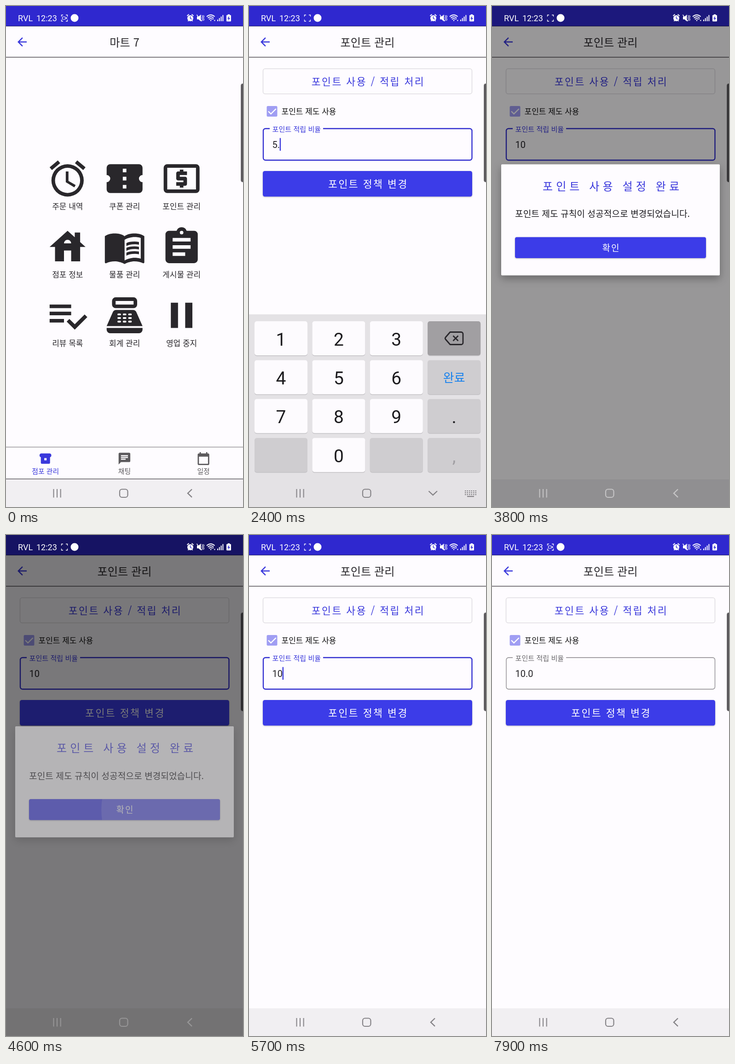
These frames come from a looping animation (515x1087 px, 8000 ms). An HTML page:

```html
<!DOCTYPE html>
<html lang="ko">
<head>
<meta charset="utf-8">
<style>
html, body { margin: 0; width: 100%; height: 100%; overflow: hidden; background: #fefcff; }
svg { display: block; width: 100%; height: 100%; }
text { font-family: 'Noto Sans CJK KR', 'Noto Sans CJK', sans-serif; white-space: pre; }
.num { font-family: Roboto, sans-serif; }
</style>
</head>
<body>
<svg id="stage" viewBox="0 0 515 1087" preserveAspectRatio="none"></svg>
<script>
const LOOP = 8000;
const BLUE = '#3a38dc', INK = '#29272b', PAPER = '#fefcff';

const rect = (x, y, w, h, fill, r = 0, more = '') =>
  `<rect x="${x}" y="${y}" width="${w}" height="${h}" rx="${r}" fill="${fill}" ${more}/>`;
const line = (d, color, w, more = '') =>
  `<path d="${d}" fill="none" stroke="${color}" stroke-width="${w}" ${more}/>`;
const group = (id, body, more = '') => `<g id="${id}" ${more}>${body}</g>`;

// y is the optical middle of the Hangul line
function label(x, y, str, size, { fill = INK, weight = 400, gap = 0, anchor = 'middle' } = {}) {
  const dx = anchor === 'middle' ? gap / 2 : 0;
  return `<text x="${x + dx}" y="${y + size * 0.38}" font-size="${size}" font-weight="${weight}"
    fill="${fill}" letter-spacing="${gap}" text-anchor="${anchor}">${str}</text>`;
}
const num = (x, y, str, size, fill = '#1c1b1e', more = '') =>
  `<text class="num" x="${x}" y="${y}" font-size="${size}" fill="${fill}" ${more}>${str}</text>`;
// 24-unit glyph centred on x, y
const icon = (x, y, k, d, fill = INK) =>
  `<path transform="translate(${x} ${y}) scale(${k}) translate(-12 -12)" d="${d}" fill="${fill}" fill-rule="evenodd"/>`;

const pill = (x, y) => `M${x + .5} ${y}h1a.5 .5 0 0 1 0 1h-1a.5 .5 0 0 1 0-1z`;
const keypad = [11, 13, 15].map(y => [8, 11, 14].map(x => pill(x, y)).join('')).join('');

const GLYPH = {
  alarm: 'M12 20a7 7 0 1 1 0-14 7 7 0 0 1 0 14m0-16a9 9 0 1 0 0 18 9 9 0 0 0 0-18m.5 4H11v6l4.75 2.85.75-1.23-4-2.37V8M7.88 3.39L6.6 1.86 2 5.71l1.29 1.53 4.59-3.85M22 5.72l-4.6-3.86-1.29 1.53 4.6 3.86L22 5.72z',
  ticket: 'M13 8.5h-2v-2h2v2m0 4.5h-2v-2h2v2m0 4.5h-2v-2h2v2M22 10V6a2 2 0 0 0-2-2H4a2 2 0 0 0-2 2v4a2 2 0 0 1 0 4v4a2 2 0 0 0 2 2h16a2 2 0 0 0 2-2v-4a2 2 0 0 1 0-4z',
  cash: 'M11 17h2v-1h1c.55 0 1-.45 1-1v-3c0-.55-.45-1-1-1h-3v-1h4V8h-2V7h-2v1h-1c-.55 0-1 .45-1 1v3c0 .55.45 1 1 1h3v1H9v2h2v1zM20 4H4a2 2 0 0 0-2 2v12a2 2 0 0 0 2 2h16a2 2 0 0 0 2-2V6a2 2 0 0 0-2-2zm0 14H4V6h16v12z',
  house: 'M19 9.3V4h-3v2.6L12 3 2 12h3v8h5v-6h4v6h5v-8h3L19 9.3zm-9 .7a2 2 0 0 1 4 0h-4z',
  book: 'M12 21.5c-1.35-.85-3.8-1.5-5.5-1.5-1.65 0-3.35.3-4.75 1.05-.4.15-.75-.1-.75-.45V6c.6-.45 1.25-.75 2-1 1.11-.35 2.33-.5 3.5-.5 1.95 0 4.05.4 5.5 1.5 1.45-1.1 3.55-1.5 5.5-1.5 1.17 0 2.39.15 3.5.5.75.25 1.4.55 2 1v14.6c0 .35-.35.6-.75.45-1.4-.75-3.1-1.05-4.75-1.05-1.7 0-4.15.65-5.5 1.5M12 8v11.5c1.35-.85 3.8-1.5 5.5-1.5 1.2 0 2.4.15 3.5.5V7c-1.1-.35-2.3-.5-3.5-.5-1.7 0-4.15.65-5.5 1.5z'
    + [11.5, 14.17, 16.84].map(y => `M13 ${y}c1.11-.68 2.6-1 4.5-1 .91 0 1.76.09 2.5.25v-1.52c-.87-.15-1.71-.23-2.5-.23-1.89 0-3.39.28-4.5.84z`).join(''),
  clip: 'M19 3h-4.18a3 3 0 0 0-5.64 0H5a2 2 0 0 0-2 2v14a2 2 0 0 0 2 2h14a2 2 0 0 0 2-2V5a2 2 0 0 0-2-2zm-7 0a1 1 0 1 1 0 2 1 1 0 0 1 0-2zm2 14H7v-2h7v2zm3-4H7v-2h10v2zm0-4H7V7h10v2z',
  list: 'M14 10H2v2h12v-2zm0-4H2v2h12V6zM2 16h8v-2H2v2zm19.5-4.5L23 13l-6.99 7-4.51-4.5L13 14l3.01 3 5.49-5.5z',
  till: 'M17 2H7a2 2 0 0 0-2 2v2a2 2 0 0 0 2 2h10a2 2 0 0 0 2-2V4a2 2 0 0 0-2-2zm0 4H7V4h10v2zm3 16H4a2 2 0 0 1-2-2v-1h20v1a2 2 0 0 1-2 2zM18.53 10.19A2 2 0 0 0 16.7 9H7.3a2 2 0 0 0-1.83 1.19L2 18h20z' + keypad,
  pause: 'M6 19h4V5H6zM14 5v14h4V5z',
  back: 'M20 11H7.83l5.59-5.59L12 4l-8 8 8 8 1.41-1.41L7.83 13H20z',
  chat: 'M20 2H4a2 2 0 0 0-2 2v18l4-4h14a2 2 0 0 0 2-2V4a2 2 0 0 0-2-2zM6 9h12v2H6zm8 5H6v-2h8zm4-6H6V6h12z',
  date: 'M19 20H5V9h14m-3-7v2H8V2H6v2H5a2 2 0 0 0-2 2v14a2 2 0 0 0 2 2h14a2 2 0 0 0 2-2V6a2 2 0 0 0-2-2h-1V2z',
  shop: 'M5 3h14a3.4 3.4 0 0 1 1 6.6V19a2 2 0 0 1-2 2H6a2 2 0 0 1-2-2V9.600a3.400 3.400 0 0 1 1-6.600zM10 11v4h4v-4z'
};

const header = title =>
  rect(0, 44, 515, 983, PAPER) + rect(0, 110.500, 515, 1.300, '#3b393c') +
  icon(35, 78, 1.25, GLYPH.back, BLUE) +
  label(257.500, 79, title, 24.200, { weight: 500 });

function menu() {
  const items = [
    ['alarm', '주문 내역'], ['ticket', '쿠폰 관리'], ['cash', '포인트 관리'],
    ['house', '점포 정보'], ['book', '물품 관리'], ['clip', '게시물 관리'],
    ['list', '리뷰 목록'], ['till', '회계 관리'], ['pause', '영업 중지']];
  const cells = items.map(([g, name], i) => {
    const x = 133.800 + i % 3 * 123.900, y = 374.500 + Math.floor(i / 3) * 148.300;
    return icon(x, y, 3.9, GLYPH[g]) + label(x, y + 60, name, 17, { weight: 500 });
  }).join('');
  const tabs = [['shop', '점포 관리', BLUE, 1.25], ['chat', '채팅', '#5c5a5d', 1.27], ['date', '일정', '#5c5a5d', 1.4]]
    .map(([g, name, c, k], i) => {
      const x = 85.700 + i * 171.700;
      return icon(x, 982, k, GLYPH[g], c) + label(x, 1009, name, 14.900, { fill: c });
    }).join('');
  return header('마트 7') + cells +
    '<circle id="tap" cx="381" cy="392" fill="#29272b"/>' +
    rect(0, 956.500, 515, 1, '#68666a') + tabs + rect(0, 1025.500, 515, 1.300, '#4a484c');
}

function points() {
  return header('포인트 관리') +
    rect(30.500, 136.200, 454, 54.500, 'none', 4.500, 'stroke="#d9d7db" stroke-width="1.3"') +
    label(257.700, 164, '포인트 사용 / 적립 처리', 21.600, { fill: BLUE, weight: 500, gap: 2.500 }) +
    rect(38.500, 217, 23, 23, '#a09ef3', 2.500) +
    line('M42 228.500l5.600 5.600 11-11', '#fff', 2.400) +
    label(70.500, 228.500, '포인트 제도 사용', 17, { fill: '#111', anchor: 'start' }) +
    rect(31, 266, 453.500, 68.500, 'none', 5, 'id="box"') +
    rect(45, 262, 116, 9, PAPER) +
    group('hint', label(50.500, 267, '포인트 적립 비율', 15.100, { fill: 'inherit', anchor: 'start' })) +
    num(50.500, 308, '', 20, '#222024', 'id="value"') +
    rect(0, 286.500, 2.400, 27.500, BLUE, 0, 'id="caret"') +
    rect(30, 358, 455, 55.500, '#3c3ce8', 4.500, 'style="filter:drop-shadow(0 1.500px 1.500px rgba(0,0,0,.25))"') +
    label(257.700, 386, '포인트 정책 변경', 21.600, { fill: '#fff', weight: 500, gap: 2.500 });
}

function keyboard() {
  const rows = [['1', '2', '3', 'del'], ['4', '5', '6', '완료'], ['7', '8', '9', '.'], ['', '0', '', ',']];
  let out = rect(0, 669, 515, 418, '#e4e2e5');
  rows.forEach((row, r) => row.forEach((k, c) => {
    const x = 12 + c * 125.400, y = 684 + r * 84.400, digit = k !== '' && c < 3;
    out += rect(x, y + 1.500, 115, 74, '#c3c1c5', 5) +
      rect(x, y, 115, 74, digit ? '#fdfbfe' : '#cfcdd0', 5, k === 'del' ? 'id="del"' : '');
    const mid = x + 57.500;
    if (k === 'del') {
      out += line('M437 707.500h24a4 4 0 0 1 4 4v19a4 4 0 0 1-4 4h-24l-10-11.500q-1.500-2 0-4z', INK, 2.800, 'stroke-linejoin="round"') +
        line('M443.500 715.500l11 11m0-11l-11 11', INK, 2.800);
    } else if (k === '완료') out += label(mid, y + 38, k, 26, { fill: '#1580ee' });
    else out += num(mid, y + 52.500, k, 39, k === ',' ? '#a19fa3' : '#1c1b1e', 'text-anchor="middle"');
  }));
  return out;
}

function dialog() {
  return rect(20, 415, 475, 241, PAPER, 2, 'style="filter:drop-shadow(0 7px 9px rgba(0,0,0,.3))"') +
    label(258.500, 462, '포인트 사용 설정 완료', 24, { fill: BLUE, weight: 500, gap: 7.100 }) +
    label(50, 522.500, '포인트 제도 규칙이 성공적으로 변경되었습니다.', 19.200, { fill: '#1c1b1f', anchor: 'start' }) +
    rect(50, 573, 415, 45.500, '#3c3ce8', 4, 'style="filter:drop-shadow(0 1.500px 1.500px rgba(0,0,0,.3))"') +
    '<circle id="wave" cx="372" cy="596" fill="#fff" fill-opacity=".16" clip-path="url(#okClip)"/>' +
    label(258, 596, '확인', 19, { fill: '#fff', gap: 2 });
}

function status() {
  const W = '#fff';
  const bars = [0, 1, 2, 3].map(i => rect(459 + i * 3.800, 29.500 - i * 3.300, 2, 3.500 + i * 3.300, W)).join('');
  return num(26, 33.300, 'RVL', 18, W) + num(66, 33.300, '12:23', 18, W) +
    line('M124 19.500h-3.500v3.500M130 19.500h3.500v3.500M124 33h-3.500v-3.500M130 33h3.500v-3.500', W, 1.300) +
    group('cam', rect(122.500, 23.500, 6.500, 5.500, 'none', 1, 'stroke="#fff" stroke-width="1.2"') +
      '<path d="M129.500 26.200l3-2.400v5z" fill="#fff"/>') +
    '<circle cx="149" cy="26" r="8.500" fill="#fff"/>' +
    '<circle cx="400.500" cy="26.500" r="6.500" fill="#fff"/>' +
    line('M393.500 21.500l4-3.500M407.500 21.500l-4-3.500M395.500 33l1.500-2M405.500 33l-1.500-2', W, 1.800) +
    line('M400.500 22.500v4.300l3 1.800', '#2f28cf', 1.400) +
    '<path d="M415 23h3.500l5-4.500v15l-5-4.500H415z" fill="#fff"/>' +
    line('M414.500 19l11 14', W, 1.400) +
    line('M426 20l1.300 3-1.300 3 1.300 3-1.300 3M429 20l1.300 3-1.300 3 1.300 3-1.300 3', W, 1.200) +
    line('M436 23q9-7.500 17.500 0M438.500 26q6.500-5.500 12.500 0M441 29q4-3.500 7.500 0', W, 1.700) +
    '<path d="M443 30.500h4l-2 2.800zM448.500 29h3l-1.500-2.500zM451.500 30.500h3.500l-1.700 2.700z" fill="#fff"/>' +
    bars + rect(479, 19.500, 10, 14, W, 1.500) + rect(482, 18, 4, 2, W) +
    '<path d="M485 21.500l-4 6h2.700l-1 4.500 4.300-6h-2.700z" fill="#2f28cf"/>';
}

function navIcons() {
  const keys = [1051, 1055, 1059].map(y => [0, 1, 2, 3, 4, 5].map(i =>
    rect(469 + i * 4.500, y, 2.500, 2.200, 'currentColor')).join('')).join('');
  return [103.500, 111, 118.700].map(x => rect(x - 1, 1048, 2, 18.500, 'currentColor')).join('') +
    rect(247, 1048.500, 17.500, 17.500, 'none', 5, 'stroke="currentColor" stroke-width="2.2"') +
    group('navBack', line('M404 1048.500l-9 8.700 9 8.700', 'currentColor', 2.400)) +
    group('navDown', line('M390.500 1052.500l9.200 8.700 9.200-8.700', 'currentColor', 2.400) +
      keys + rect(474, 1063, 15, 2.200, 'currentColor'));
}

const stage = document.getElementById('stage');
stage.innerHTML =
  '<clipPath id="okClip"><rect x="50" y="573" width="415" height="45.500" rx="4"/></clipPath>' +
  '<clipPath id="app"><rect y="44" width="515" height="983"/></clipPath>' +
  group('pages', group('menu', menu()) + group('points', points()), 'clip-path="url(#app)"') +
  rect(0, 0, 515, 44, '#2f28cf') + rect(0, 43, 515, 1.200, '#231e70') +
  rect(510.500, 168.500, 9, 213.500, '#59575a', 4, 'stroke="#8b898c" stroke-width="1"') +
  group('keys', keyboard()) +
  rect(0, 1027, 515, 60, '#f1eff2', 0, 'id="navBg"') +
  rect(0, 0, 515, 1087, '#000', 0, 'id="shade"') +
  group('dialog', dialog()) + status() + group('nav', navIcons());

const el = {};
stage.querySelectorAll('[id]').forEach(n => el[n.id] = n);
const set = (id, attrs) => { for (const k in attrs) el[id].setAttribute(k, attrs[k]); };
const show = (id, on) => set(id, { visibility: on ? 'visible' : 'hidden' });
const ramp = (t, a, b) => Math.min(1, Math.max(0, (t - a) / (b - a)));
const within = (t, a, b) => t >= a && t < b;

const easeOut = p => 1 - (1 - p) ** 5;
const fade = e => e < .5 ? e / 2 : e < .9 ? .25 + (e - .5) * 1.125 : .7 + (e - .9) * 3;

function pageIn(t) {
  if (t < 6330) return easeOut(ramp(t, 510, 860));
  if (t < 7000) return 1 - ramp(t, 6330, 6480);
  return easeOut(ramp(t, 7340, 7690));
}

function valueAt(t) {
  const steps = [[0, '5.0'], [2200, '5.'], [2450, '5'], [2500, ''], [2800, '1'], [3200, '10'], [7000, '10.0']];
  return steps.filter(s => t >= s[0]).pop()[1];
}

function draw(t) {
  const e = pageIn(t);
  show('points', e > 0);
  set('points', { opacity: fade(e), transform: `translate(0 ${(1 - e) * 79})` });

  const press = t < 3000 ? t - 80 : t - 7080;
  set('tap', { r: 12 + 46 * ramp(press, 0, 250), 'fill-opacity': press < 0 ? 0 : .1 * (1 - ramp(press, 250, 480)) });

  const focus = within(t, 1600, 7000), text = valueAt(t);
  set('box', { stroke: focus ? '#322fd0' : '#858387', 'stroke-width': focus ? 2.4 : 1.3 });
  set('hint', { fill: focus ? BLUE : '#69676b' });
  el.value.textContent = text;
  const caretX = 50.5 + [...text].reduce((w, c) => w + (c === '.' ? 5.27 : 11.23), 0);
  set('caret', { x: caretX - .3 });
  show('caret', e > 0 && (within(t, 1600, 2100) || within(t, 2200, 3650) || within(t, 4750, 5200) || within(t, 5700, 6200)));

  const up = easeOut(ramp(t, 1560, 1900)) - ramp(t, 3560, 3780) ** 1.5;
  show('keys', up > 0);
  set('keys', { transform: `translate(0 ${(1 - up) * 418})` });
  set('del', { fill: within(t, 2100, 2500) ? '#a19fa2' : '#cfcdd0' });
  const typing = within(t, 1600, 3700);
  set('navBg', { fill: typing ? '#e4e2e5' : '#f1eff2' });
  show('navBack', !typing);
  show('navDown', typing);

  const out = ramp(t, 4400, 4900);
  set('shade', { opacity: .7 * ramp(t, 3570, 3970) * (1 - out ** 1.5) });
  const card = ramp(t, 3590, 3720) * (1 - ramp(t, 4450, 4728));
  show('dialog', card > 0);
  set('dialog', { opacity: card, transform: `translate(0 ${-179 * (1 - ramp(t, 3600, 4200)) ** 2.25})` });
  set('wave', { r: t < 4380 ? 0 : 20 + 144 * ramp(t, 4380, 4600) + 150 * ramp(t, 4600, 4800) });

  const dim = within(t, 3700, 4800);
  set('nav', { color: dim ? '#fff' : '#858387', opacity: dim ? .48 - .45 * ramp(t, 4400, 4800) : 1 });
  show('cam', !within(t % 1000, 400, 900));
}

const start = performance.now();
function tick() {
  draw((performance.now() - start) % LOOP);
  requestAnimationFrame(tick);
}
draw(0);
tick();
</script>
</body>
</html>
```
